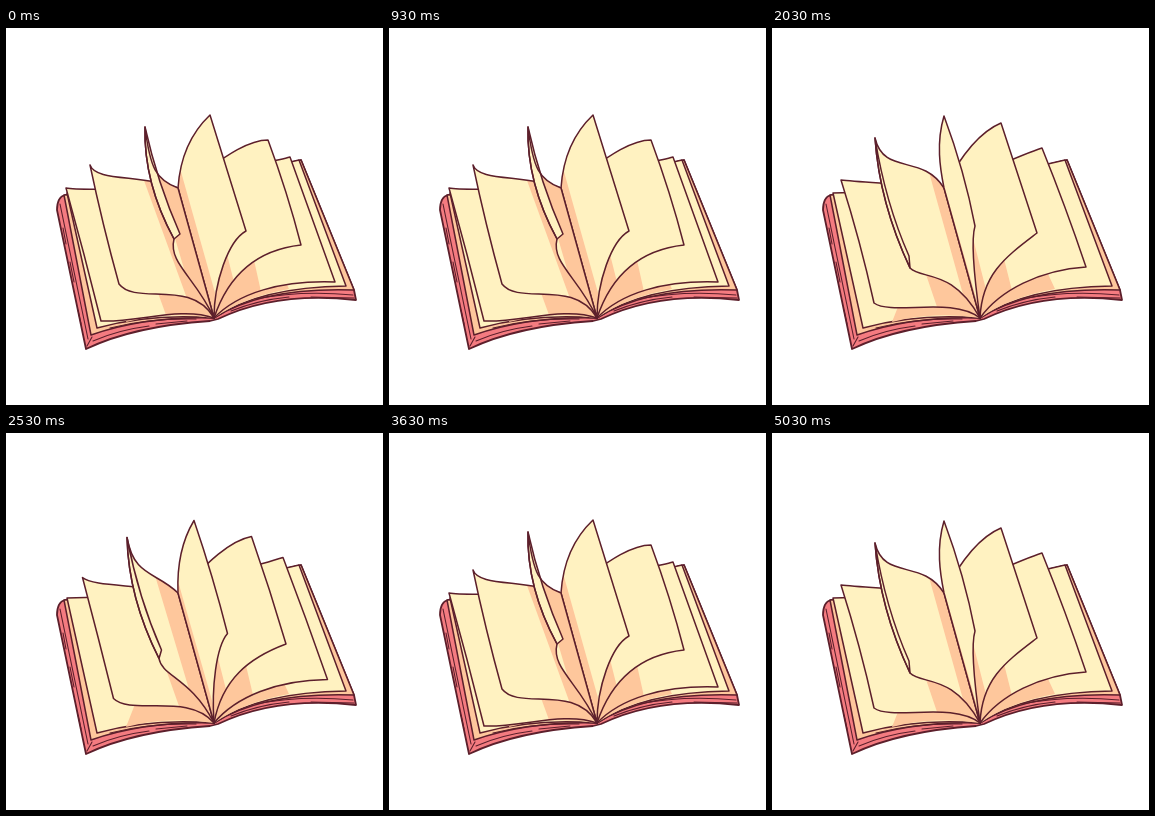
Animation of 377 by 377 pixels, one loop 5.1 s. Source, as an HTML page with a canvas:

```html
<!DOCTYPE html>
<html lang="en">
<head>
<meta charset="utf-8">
<title>Turning pages</title>
<style>
html, body { margin: 0; width: 100%; height: 100%; overflow: hidden; background: #fff; }
canvas { display: block; }
</style>
</head>
<body>
<canvas id="book" width="377" height="377"></canvas>
<script>
const ctx = document.getElementById('book').getContext('2d');
const INK = '#5c1f2b', CREAM = '#fff2c1', PEACH = '#fec79c', PINK = '#f47b80';
const LOOP = 5100;
const TOP = [172, 160], FOOT = [208, 290];

// A leaf by turning step, right to left:
// tip, two top-edge controls, outer bend, corner, two bottom-edge controls
const LEAVES = {
  0: [284, 129, 262, 136, 200, 140, 0, 329, 254, 275, 252, 232, 265],
  2: [270, 120, 245, 128, 200, 150, 2, 314, 239, 268, 242, 228, 262],
  3: [262, 112, 232, 112, 195, 150, 3, 295, 217, 250, 222, 222, 248],
  5: [229, 95, 205, 105, 185, 135, 0, 265, 205, 235, 228, 210, 245],
  6: [204, 87, 185, 105, 174, 130, 0, 240, 203, 222, 213, 208, 255],
  8: [172, 88, 164, 115, 168, 140, 5, 203, 198, 198, 215, 203, 255],
  9: [139, 99, 144, 140, 150, 152, -16, 168, 211, 162, 235, 190, 250],
  11: [103, 110, 112, 148, 150, 125, -13, 138, 240, 150, 252, 180, 240],
  12: [84, 137, 90, 154, 135, 146, -2, 113, 256, 130, 278, 185, 250],
  14: [69, 152, 85, 154, 130, 156, 3, 102, 275, 120, 288, 180, 268],
  15: [60, 160, 75, 163, 130, 160, 1, 95, 293, 130, 295, 175, 278]
};

const leafAt = step => LEAVES[step] ||
  LEAVES[step - 1].map((v, i) => (v + LEAVES[step + 1][i]) / 2);

function draw(d, fill, line = 1.5) {
  const path = new Path2D(d);
  if (fill) { ctx.fillStyle = fill; ctx.fill(path); }
  if (line) { ctx.lineWidth = line; ctx.strokeStyle = INK; ctx.stroke(path); }
}

function cubic(p, t) {
  const u = 1 - t;
  return [0, 1].map(i => u * u * u * p[i] + 3 * u * u * t * p[i + 2] +
    3 * u * t * t * p[i + 4] + t * t * t * p[i + 6]);
}

function drawLeaf(step) {
  const [tx, ty, ax, ay, bx, by, bend, cx, cy, dx, dy, ex, ey] = leafAt(step);
  const mx = (tx + cx) / 2 + bend, my = (ty + cy) / 2;
  const top = [tx, ty, ax, ay, bx, by, ...TOP];
  const bottom = [cx, cy, dx, dy, ex, ey, ...FOOT];
  const outline = `M${TOP}C${bx} ${by} ${ax} ${ay} ${tx} ${ty}` +
    `Q${mx} ${my} ${cx} ${cy}C${dx} ${dy} ${ex} ${ey} ${FOOT}Z`;
  const curled = step >= 9 && step <= 11;
  const shade = curled ? 0.5 - 0.15 * (step - 9) : 0.12 + 0.045 * Math.abs(step - 8);

  draw(outline, CREAM, 0);
  const edge = [];
  for (let i = 0; i <= 10; i++) {
    const t = 1 - shade * (1 - i / 10);
    edge.push(cubic(top, t));
    edge.unshift(cubic(bottom, t));
  }
  // Bottom half runs foot to shade line, top half shade line to spine.
  draw('M' + edge.join('L') + 'Z', PEACH, 0);

  if (curled) {
    const k = (step - 9) / 2;
    const x = cx + 6 - 7 * k, y = cy - 5 - 7 * k;
    draw(`M${tx} ${ty}Q${mx + 14 - 8 * k} ${my} ${x} ${y}L${cx} ${cy}Q${mx} ${my} ${tx} ${ty}Z`, CREAM);
  }
  draw(outline);
}

function drawCover() {
  draw('M59 167Q51 169 51 182L80 321Q128 298 204 293L212 291Q270 263 350 272L348 262L295 132L172 162Z', PINK, 1.8);
  draw('M58 167L85 307Q140 288 208 290L172 162Z', PEACH);
  draw('M295 132L348 262Q256 259 208 290L172 160Z', PEACH);
  draw('M61 165L91 300Q145 285 208 290L172 162Z', CREAM);
  draw('M120 294L133 291Q170 284 208 290L172 162Z', PEACH, 0);
  draw('M293 132L340 258Q254 259 208 290L172 160Z', CREAM);
  draw('M208 290Q238 269 283 261L271 235L172 160Z', PEACH, 0);
  // Ink marks along the cover and page block
  draw('M54 176L82 311M57 200L60 216M64 234L68 254M72 282L75 296' +
    'M81 318L86 309M87 313Q112 302 143 298M104 300Q145 290 190 291M150 296L181 293' +
    'M225 283Q252 272 283 269M250 271Q295 262 347 267M305 269L348 270', null, 1.1);
}

function drawPose(pose) {
  ctx.fillStyle = '#fff';
  ctx.fillRect(0, 0, 377, 377);
  drawCover();
  const steps = [];
  for (let s = pose; s <= 15; s += 3) steps.push(s);
  // Flattest leaves lie underneath
  steps.sort((a, b) => Math.abs(b - 8) - Math.abs(a - 8)).forEach(drawLeaf);
}

ctx.lineJoin = ctx.lineCap = 'round';
let shown = -1;
const start = performance.now();

function tick() {
  const t = (performance.now() - start) % LOOP;
  const pose = Math.max(0, Math.floor((t - 30) / 100)) % 3;
  if (pose !== shown) drawPose(shown = pose);
  requestAnimationFrame(tick);
}
tick();
</script>
</body>
</html>
```
